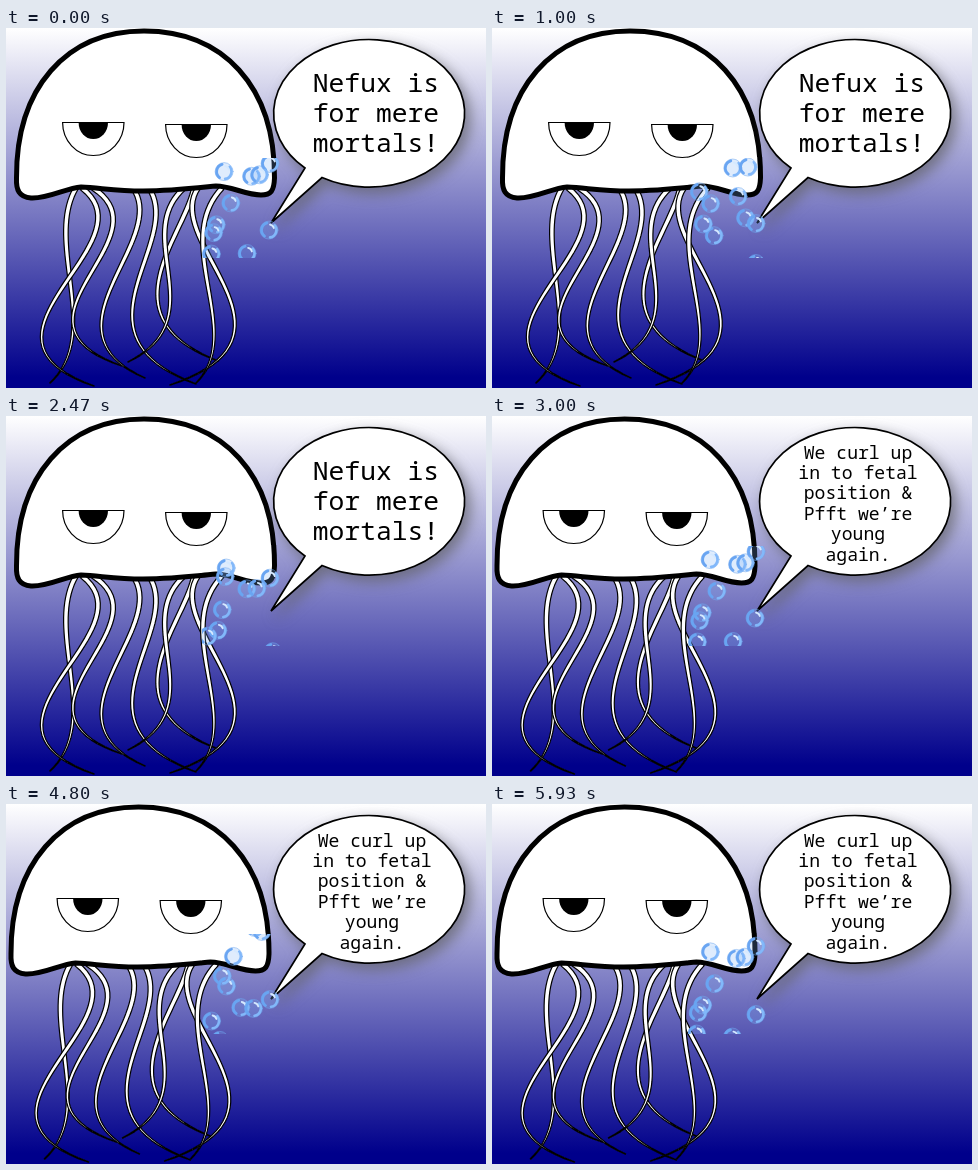
Write an HTML page that moves like this. It is 480 px wide and 360 px high and loops after 5990 ms.

```html
<!DOCTYPE html>
<html lang="en">
<head>
<meta charset="utf-8">
<title>Jellyfish</title>
<style>
  html, body { margin: 0; width: 100%; height: 100%; overflow: hidden; background: #00008b; }
  svg { display: block; width: 480px; height: 360px; }
  text { font-family: "Noto Sans Mono", "DejaVu Sans Mono", monospace; font-weight: 300; fill: #000; }
  #boast { font-size: 26.3px; }
  #reason { font-size: 18.1px; text-anchor: middle; }
  .speech { fill: #fff; stroke: #000; stroke-width: 1.7; filter: drop-shadow(5px 6px 7px rgba(95, 95, 100, .7)); }
  .arm { fill: #fff; stroke: #000; stroke-width: 1.2; stroke-linejoin: round; }
  .lid { fill: #fff; stroke: #000; stroke-width: 1.2; }
</style>
</head>
<body>
<svg viewBox="0 0 480 360">
  <defs>
    <linearGradient id="sea" x1="0" y1="0" x2="0" y2="1">
      <stop offset="0" stop-color="#fff"/>
      <stop offset=".97" stop-color="#00008b"/>
    </linearGradient>
    <clipPath id="tank"><rect x="196" y="130" width="81" height="100"/></clipPath>
    <g id="bubble" fill="none" stroke-linecap="round">
      <circle r="9" fill="#78b0f5" fill-opacity=".24" stroke="#6ea8f0" stroke-opacity=".5"/>
      <path d="M-2 -7.2A7.5 7.5 0 0 0 -4.5 6" stroke="#69a5f2" stroke-width="2.8"/>
      <path d="M5.6 -4.8A7.4 7.4 0 0 1 1 7.3" stroke="#82b8fa" stroke-width="2.6"/>
      <path d="M1 -5.5Q4 -5 4.8 -2" stroke="#d5e9ff" stroke-width="1.8"/>
    </g>
    <g id="eye">
      <path class="lid" d="M-30.7 0H30.7A30.7 33 0 0 1 -30.7 0Z"/>
      <path d="M-14.7 0H14.7A14.7 16.5 0 0 1 -14.7 0Z"/>
    </g>
  </defs>

  <rect width="480" height="360" fill="url(#sea)"/>

  <g id="jelly">
    <g id="arms"></g>
    <path fill="#fff" stroke="#000" stroke-width="5" stroke-linejoin="round"
      d="M10.5 150C10 60 60 3 138 3C217 3 269 58 268.5 150C268 163 265 167 255 167C240 167 225 158 210 158C190 160 165 163 137 163C110 163 95 160 75 159C60 160 42 171 25 170C13 169 10 162 10.5 150Z"/>
    <use href="#eye" x="87.3" y="94.5"/>
    <use href="#eye" x="190.3" y="96.5"/>
  </g>

  <path class="speech" d="M299 140A95.500 73.800 0 1 1 316 149.500L265 195Z"/>
  <g id="boast"></g>
  <g id="reason"></g>
  <g id="bubbles" clip-path="url(#tank)"></g>
</svg>

<script>
const $ = id => document.getElementById(id);

function add(parent, tag, attrs) {
  const el = document.createElementNS("http://www.w3.org/2000/svg", tag);
  for (const key in attrs) el.setAttribute(key, attrs[key]);
  return parent.appendChild(el);
}

function write(id, x, y, leading, lines) {
  lines.forEach((line, i) => {
    add($(id), "text", { x, y: y + i * leading }).textContent = line;
  });
}
write("boast", 306.8, 64, 30, ["Nefux is", "for mere", "mortals!"]);
write("reason", 366, 42.5, 20.4, ["We curl up", "in to fetal", "position &", "Pfft we’re", "young", "again."]);

// Tapered S-curve from the bell down to (x3, end); x1 and x2 pull it sideways
function arm(x0, x1, x2, x3, end) {
  const top = 160, drop = end - top, steps = 40;
  const bezier = (a, b, c, d, u) =>
    a * (1 - u) ** 3 + 3 * b * u * (1 - u) ** 2 + 3 * c * u * u * (1 - u) + d * u ** 3;
  const at = u => [bezier(x0, x1, x2, x3, u), top + drop * bezier(0, 0.28, 0.75, 1, u)];
  const left = [], right = [];
  for (let k = 0; k <= steps; k++) {
    const u = k / steps, [x, y] = at(u), [px, py] = at(u - 0.01), [qx, qy] = at(u + 0.01);
    const half = (0.3 + 2.1 * (1 - u * u)) / Math.hypot(qx - px, qy - py);
    const nx = (py - qy) * half, ny = (qx - px) * half;
    left.push([x + nx, y + ny]);
    right.unshift([x - nx, y - ny]);
  }
  add($("arms"), "path", { class: "arm", d: "M" + left.concat(right).join("L") + "Z" });
}
arm(70, 38, 97, 44, 355);
arm(76, 148, -55, 88, 358);
arm(87, 164, -14, 116, 338);
arm(127, 164, 30, 139, 350);
arm(143, 179, 57, 190, 356);
arm(188, 178, 98, 212, 333);
arm(178, 124, 210, 122, 334);
arm(192, 155, 312, 164, 357);
arm(216, 164, 240, 190, 355);

// Bubbles rise from the sea floor of the tank and repeat every CYCLE seconds
const CYCLE = 3, FLOOR = 238;
const bubbles = [];
function bubble(birth, speed, x, drift) {
  bubbles.push({ birth, speed, x, drift, el: add($("bubbles"), "use", { href: "#bubble" }) });
}
bubble(0.05, 32, 224, -2);
bubble(0.42, 83, 257, -6);
bubble(0.5, 85, 269, -10);
bubble(0.95, 50, 264, 0);
bubble(1.05, 46, 228, 9);
bubble(1.1, 48, 244, 5);
bubble(1.2, 35, 196, 16);
bubble(1.75, 33, 214, -3);
bubble(1.85, 29, 195, 11);
bubble(2.43, 63, 267, -7);
bubble(2.6, 30, 203, 6);
bubble(2.78, 57, 240, 5);

const LOOP = 5990, STEPS = 90, RATE = 15;
const start = performance.now();

function draw(now) {
  const ms = Math.max(0, now - start) % LOOP;
  // Each 200 ms holds steps of 70, 70 and 60 ms
  const step = Math.min(STEPS - 1, Math.floor(ms / 200) * 3 + Math.min(2, Math.floor((ms % 200) / 70)));
  const second = step >= STEPS / 2;
  $("jelly").setAttribute("transform", `translate(${second ? -5.5 : 0} 0)`);
  $("boast").style.display = second ? "none" : "";
  $("reason").style.display = second ? "" : "none";
  for (const b of bubbles) {
    const age = (step / RATE - b.birth + CYCLE) % CYCLE;
    b.el.setAttribute("transform", `translate(${b.x + b.drift * age} ${FLOOR - b.speed * age})`);
  }
  requestAnimationFrame(draw);
}
draw(start);
</script>
</body>
</html>
```
